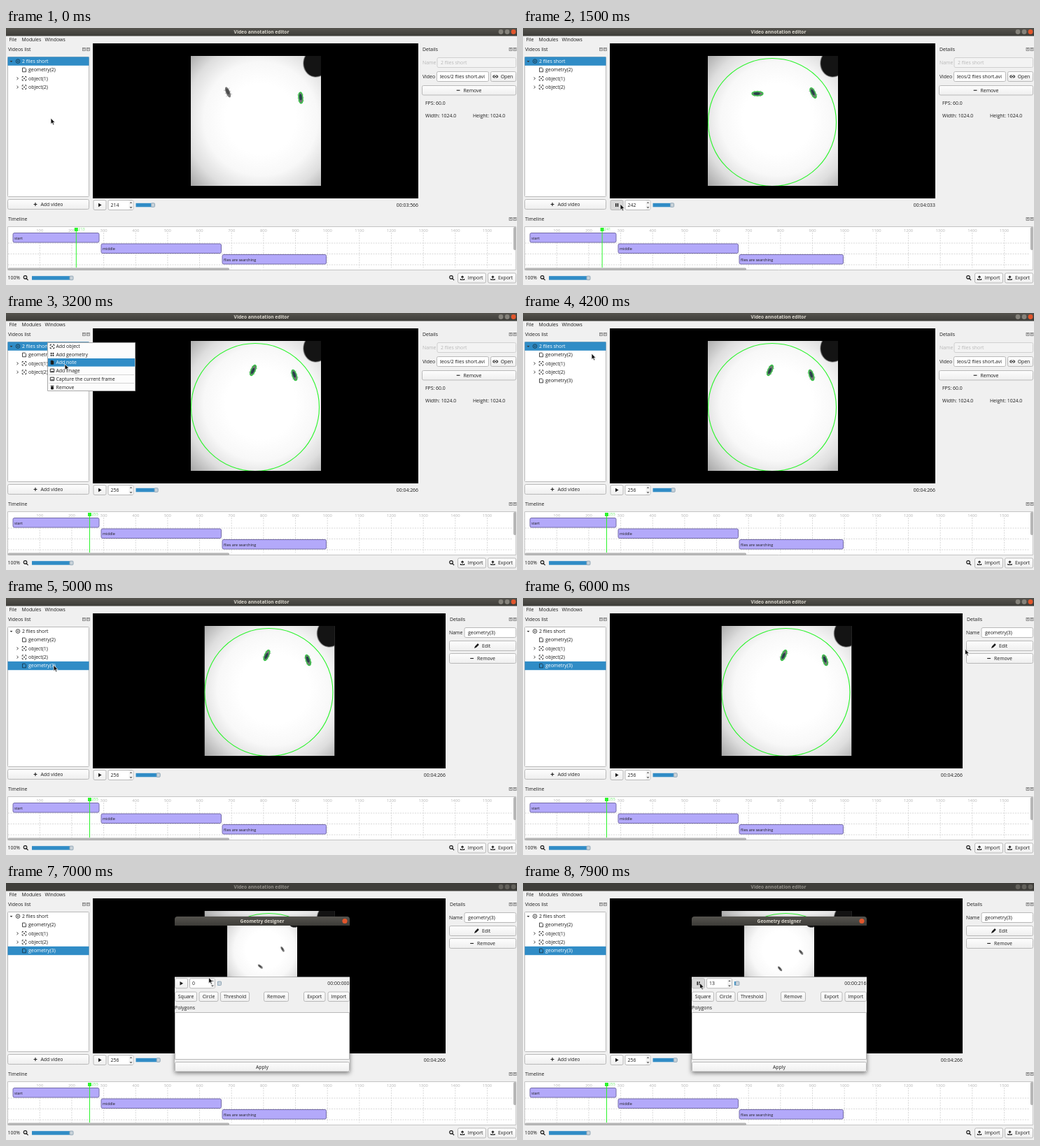
An HTML page with a canvas for the animation above (8000 ms loop, 730 by 368 pixels).

```html
<!DOCTYPE html>
<html lang="en">
<head>
<meta charset="utf-8">
<title>Video annotation editor</title>
<style>
  html, body { margin: 0; width: 730px; height: 368px; overflow: hidden; background: #f0f0f0; }
  canvas, svg { position: absolute; left: 0; top: 0; display: block; }
  #dialog { left: 241px; top: 48px; border-radius: 4px 4px 0 0; box-shadow: 0 2px 6px #0008; }
</style>
</head>
<body>
<canvas id="main" width="730" height="368"></canvas>
<canvas id="dialog" width="250" height="222"></canvas>
<svg id="cursor" width="12" height="14" viewBox="-1 -1 12 14">
  <path d="M0 0V8.5L2 6.8 3.4 10 4.8 9.3 3.5 6.3H6Z" fill="#111" stroke="#fff" stroke-width=".7"/>
</svg>
<script>
const LOOP = 8000, STEP = 100;
const PLAY = 700, FRAME_RATE = 35, FIRST = 214, LAST = 256;
const MENU_OPEN = 2700, MENU_CLOSE = 3900, SELECT = 4800, DIALOG = 6300, DIALOG_PLAY = 7530;
const BLUE = '#308cc6', INK = '#1c1c1c', GREEN = '#2cf52c';

const $ = id => document.getElementById(id);
const mainCtx = $('main').getContext('2d');
const dialogCtx = $('dialog').getContext('2d');
dialogCtx.translate(-241, -48);
let g = mainCtx;

const icons = Object.fromEntries(Object.entries({
  plus: 'M-2.4 0H2.4M0-2.4V2.4',
  minus: 'M-2.4 0H2.4',
  upload: 'M0 1.2V-2.5M-1.7-1L0-2.7 1.7-1M-2.6 1V2.5H2.6V1',
  edit: 'M-2.5 2.5L-1.8.8 1.6-2.6 2.6-1.6-.8 1.8Z',
  link: 'M-.6-1.5H-1.8A1.5 1.5 0 0 0-1.8 1.5H-.6M.6-1.5H1.8A1.5 1.5 0 0 1 1.8 1.5H.6M-1.2 0H1.2',
  zoom: 'M.9 .9L3.6 3.6M1.8-.6A2.3 2.3 0 1 1-2.8-.6A2.3 2.3 0 1 1 1.8-.6',
  object: 'M-2.8-1V-2.8H-1M1-2.8H2.8V-1M2.8 1V2.8H1M-1 2.8H-2.8V1M-1 0H1M0-1V1',
  page: 'M-2.5-2.8H1.2L2.5-1.5V2.8H-2.5Z',
  grid: 'M-2-2H-.9V-.9H-2ZM.9-2H2V-.9H.9ZM-2 .9H-.9V2H-2ZM.9 .9H2V2H.9Z',
  note: 'M-1.8-2.5H.8L1.8-1.5V2.5H-1.8ZM-.8 0H.8M0-1V1',
  image: 'M-2.7-2.3H2.7V2.3H-2.7ZM-1.7 1.2H1.8',
  trash: 'M-1.5-1V2.3H1.5V-1ZM-2.3-2.4H2.3',
  reel: 'M2.8 0A2.8 2.8 0 1 1-2.8 0A2.8 2.8 0 1 1 2.8 0M.7 0A.7 .7 0 1 1-.7 0A.7 .7 0 1 1 .7 0',
  right: 'M-1-1.8L1 0-1 1.8',
  down: 'M-1.8-.7H1.8L0 1.3Z',
  up: 'M-1.4 .7H1.4L0-1Z',
}).map(([name, d]) => [name, new Path2D(d)]));

const clamp = (v, lo = 0, hi = 1) => Math.min(hi, Math.max(lo, v));

// Interpolates rows of [key, ...values]
function track(rows, key, ease = p => p) {
  const i = rows.findIndex(r => r[0] > key);
  if (i < 0) return rows.at(-1).slice(1);
  if (i === 0) return rows[0].slice(1);
  const a = rows[i - 1], b = rows[i], p = ease((key - a[0]) / (b[0] - a[0]));
  return a.slice(1).map((v, k) => v + (b[k + 1] - v) * p);
}

function rect(x, y, w, h, fill) {
  g.fillStyle = fill;
  g.fillRect(x, y, w, h);
}

function box(x, y, w, h, fill, stroke = '#b9b9b9', radius = 2) {
  g.beginPath();
  g.roundRect(x + .5, y + .5, w - 1, h - 1, radius);
  g.fillStyle = fill;
  g.fill();
  g.strokeStyle = stroke;
  g.lineWidth = 1;
  g.stroke();
}

function dot(x, y, r, fill) {
  g.beginPath();
  g.arc(x, y, r, 0, 7);
  g.fillStyle = fill;
  g.fill();
}

function text(s, x, y, { color = INK, size = 6.9, align = 'left', weight = 400 } = {}) {
  g.font = `${weight} ${size}px "Open Sans", sans-serif`;
  g.textAlign = align;
  g.fillStyle = color;
  g.fillText(s, x, y + size * .35);
}

function icon(name, x, y, color = INK, filled = false, width = .9) {
  g.save();
  g.translate(x, y);
  g.strokeStyle = g.fillStyle = color;
  g.lineWidth = width;
  g.stroke(icons[name]);
  if (filled) g.fill(icons[name]);
  g.restore();
}

function vertical(y, h, top, bottom) {
  const fill = g.createLinearGradient(0, y, 0, y + h);
  fill.addColorStop(0, top);
  fill.addColorStop(1, bottom);
  return fill;
}

function button(x, y, w, h, label, iconName, pressed) {
  box(x, y, w, h, pressed ? '#d9d9d9' : vertical(y, h, '#fefefe', '#eeeeee'));
  const cx = x + w / 2, cy = y + h / 2;
  text(label, cx + (iconName ? 5 : 0), cy, { align: 'center' });
  if (iconName) icon(iconName, cx - g.measureText(label).width / 2 - 2.5, cy, INK, iconName === 'edit', 1.1);
}

function dockIcons(x, y) {
  for (const dx of [0, 6]) {
    g.strokeStyle = '#777';
    g.lineWidth = .8;
    g.strokeRect(x + dx - 2, y - 2, 4, 4);
    text('×', x + dx, y, { size: 5, align: 'center', color: '#444' });
  }
}

const clock = frame => {
  const ms = Math.floor(frame * 1000 / 60), pad = (n, w) => String(n).padStart(w, '0');
  return `00:${pad(Math.floor(ms / 1000), 2)}:${pad(ms % 1000, 3)}`;
};

function slider(x, y, end) {
  rect(x, y, end - x - 4, 5.5, BLUE);
  box(end - 6, y - .5, 6, 6.5, '#c9d3da', '#94a9b8', 1);
}

function player(x, y, frame, playing, sliderEnd, timeX) {
  button(x, y - 7.5, 19, 15, '', null, playing);
  const cx = x + 9.5;
  if (playing) {
    rect(cx - 2, y - 2.5, 1.5, 5, INK);
    rect(cx + .7, y - 2.5, 1.5, 5, INK);
  } else {
    g.beginPath();
    g.moveTo(cx - 2, y - 2.7);
    g.lineTo(cx + 2.6, y);
    g.lineTo(cx - 2, y + 2.7);
    g.fillStyle = INK;
    g.fill();
  }
  box(x + 21, y - 7.5, 37, 15, '#fff');
  rect(x + 51, y - 6.5, 6, 13, '#f3f3f3');
  icon('up', x + 54, y - 3.5, '#555', true, .2);
  icon('down', x + 54, y + 3.5, '#555', true, .1);
  text(frame, x + 25, y);
  slider(x + 61, y - 2.7, sliderEnd);
  text(clock(frame), timeX, y, { align: 'right' });
}

function fly([x, y, angle], outlined) {
  g.save();
  g.translate(x, y);
  g.rotate(angle * Math.PI / 180);
  g.strokeStyle = '#999';
  g.lineWidth = .6;
  g.beginPath();
  for (const s of [-1, 1]) for (const dx of [-3, 0, 3]) {
    g.moveTo(dx, 0);
    g.lineTo(dx * 1.6, 4.5 * s);
  }
  g.stroke();
  g.beginPath();
  g.ellipse(0, 0, 8, 3, 0, 0, 7);
  g.fillStyle = '#757575';
  g.fill();
  if (outlined) {
    g.strokeStyle = '#35c445';
    g.lineWidth = 1.3;
    g.stroke();
  }
  g.beginPath();
  g.ellipse(-1, 0, 4.5, 1.9, 0, 0, 7);
  g.fillStyle = outlined ? '#27424a' : '#4d4d4d';
  g.fill();
  g.restore();
}

// Video picture in a 186 unit square
function picture(x, y, size, drawContent) {
  g.save();
  g.translate(x, y);
  g.scale(size / 186, size / 186);
  g.beginPath();
  g.rect(0, 0, 186, 186);
  g.clip();
  const light = g.createRadialGradient(100, 90, 50, 100, 90, 140);
  light.addColorStop(0, '#fff');
  light.addColorStop(.35, '#f8f8f8');
  light.addColorStop(.65, '#dedede');
  light.addColorStop(1, '#a2a2a2');
  rect(0, 0, 186, 186, light);
  g.beginPath();
  g.ellipse(179, 10, 18, 20, .15, 0, 7);
  g.fillStyle = '#141414';
  g.fill();
  g.strokeStyle = '#6668';
  g.lineWidth = 1.5;
  g.stroke();
  drawContent();
  g.restore();
}

function titleBar(x, y, w, h, title, active) {
  rect(x, y, w, h, active ? vertical(y, h, '#55534e', '#3d3c38') : '#3f3e3a');
  text(title, x + w / 2, y + h / 2, { size: 6.6, weight: 700, align: 'center', color: active ? '#dfdbd2' : '#96938d' });
}

function drawTree(t) {
  const items = [['2 flies short', 'reel', 'down'], ['geometry(2)', 'page'], ['object(1)', 'object', 'right'], ['object(2)', 'object', 'right']];
  if (t >= MENU_CLOSE) items.push(['geometry(3)', 'page']);
  const selected = t < SELECT ? 0 : 4;
  box(2, 41, 117, 201, '#fff', '#b9b9b9', 1);
  items.forEach(([label, iconName, arrow], i) => {
    const y = 47.6 + 12.35 * i, indent = i ? 9 : 0;
    if (i === selected) rect(2.5, y - 6.2, 116, 12.4, BLUE);
    if (arrow) icon(arrow, 7.5 + indent, y, '#333', !i, i ? .9 : .1);
    icon(iconName, 17 + indent, y, i === selected ? '#16384f' : '#333');
    text(label, 23 + indent, y, { color: i === selected ? '#fff' : INK });
  });
  button(2, 245, 117, 15, 'Add video', 'plus');
}

function drawMenu(pointerY) {
  const items = [['Add object', 'object', 48], ['Add geometry', 'grid', 59.3], ['Add note', 'note', 70.8],
    ['Add image', 'image', 82.4], ['Capture the current frame', 'image', 94.5], ['Remove', 'trash', 106.7]];
  box(59, 42, 126, 70, '#fcfcfc', '#a8a8a8', 0);
  rect(61, 88, 122, 1, '#d5d5d5');
  rect(61, 100, 122, 1, '#d5d5d5');
  for (const [label, iconName, y] of items) {
    const hover = Math.abs(pointerY - y) < 5.8;
    if (hover) rect(60, y - 5.8, 124, 11.6, BLUE);
    icon(iconName, 66, y, INK, /note|trash|grid/.test(iconName));
    text(label, 71.5, y, { color: hover ? '#fff' : INK });
  }
}

function drawDetails(geometry) {
  const x = geometry ? 633 : 594;
  text('Details', x + 1, 30.5);
  dockIcons(721, 30.5);
  const disabled = '#b8b8b8';
  text('Name', x + (geometry ? 0 : 1), 49.5, { color: geometry ? INK : disabled });
  box(x + 21.5, 42, 729 - x - 21.5, 15, geometry ? '#fff' : '#f3f3f3', geometry ? '#b9b9b9' : '#d0d0d0');
  text(geometry ? 'geometry(3)' : '2 flies short', x + 27, 49.5, { color: geometry ? INK : disabled });
  if (geometry) {
    button(x, 61, 96, 15, 'Edit', 'edit');
    button(x, 79, 96, 15, 'Remove', 'minus');
    return;
  }
  text('Video', 595, 70);
  box(615, 62, 75, 15, '#fff');
  g.save();
  g.beginPath();
  g.rect(620, 63, 66, 13);
  g.clip();
  text('videos/2 flies short.avi', 684, 70, { align: 'right' });
  g.restore();
  button(692, 62, 37, 15, 'Open', 'link');
  button(594, 82, 135, 14.5, 'Remove', 'minus');
  text('FPS: 60.0', 599, 107.5);
  text('Width: 1024.0', 599, 126);
  text('Height: 1024.0', 667, 126);
}

function drawVideo(t, frame, right) {
  rect(124, 22, right - 124, 222, '#000');
  const started = t >= PLAY;
  picture((124 + right) / 2 - 92.5, 40, 186, () => {
    fly(track([[FIRST, 53, 52, 68], [242, 71, 54, 0], [LAST, 89, 42, -66]], frame), started);
    fly(track([[FIRST, 157, 60, 85], [242, 150.5, 53, 64], [LAST, 148, 49, 72]], frame), true);
    if (!started) return;
    g.beginPath();
    g.arc(92, 95, 91.5, 0, 7);
    g.strokeStyle = GREEN;
    g.lineWidth = 1.1;
    g.stroke();
  });
  const sliderEnd = 189.5 + frame * (right > 600 ? .122 : .11);
  player(124.5, 253.5, frame, started && frame < LAST, sliderEnd, right);
}

function drawTimeline(frame) {
  const toX = f => 2.6 + f * .4566;
  text('Timeline', 3, 273.5);
  dockIcons(721, 273.5);
  box(2, 284, 727, 63, '#fff', '#c4c4c4', 0);
  g.save();
  g.setLineDash([2, 1.5]);
  g.strokeStyle = '#cfcfcf';
  g.lineWidth = .8;
  g.beginPath();
  for (let f = 0; f <= 1500; f += 100) {
    g.moveTo(toX(f), 293);
    g.lineTo(toX(f), 343);
    if (f) text(f, toX(f), 289.5, { size: 5.8, align: 'center', color: '#b4b4b4' });
  }
  for (const y of [308, 323.5, 339]) {
    g.moveTo(3, y);
    g.lineTo(724, y);
  }
  g.stroke();
  g.restore();
  [['start', 9.5, 124], ['middle', 135.5, 172.5], ['flies are searching', 308.5, 149.5]].forEach(([label, x, w], i) => {
    const y = 293 + 15.5 * i;
    box(x, y, w, 14.5, '#b3a9fa', '#756ca8');
    text(label, x + 2.5, y + 7.6, { size: 5.5 });
  });
  const x = toX(frame);
  rect(x - .5, 288, 1, 55, GREEN);
  rect(x - 2.5, 286, 5, 5, GREEN);
  text(frame - 1, x + 3, 288, { size: 5.4, color: '#6eea6e' });
  box(725, 285, 3.5, 33, '#bdbdbd', '#aaa', 1);
  box(3, 343.5, 316, 3.5, '#bdbdbd', '#aaa', 1);

  text('100%', 2.5, 358);
  icon('zoom', 28, 357.5, INK, false, 1.2);
  slider(37, 355.2, 96.5);
  icon('zoom', 636.5, 357.5, INK, false, 1.2);
  button(645, 350.5, 41, 15, 'Import', 'upload');
  button(688, 350.5, 41, 15, 'Export', 'upload');
}

function drawMain(t, frame, pointerY) {
  g = mainCtx;
  const active = t <= DIALOG, geometry = t >= SELECT;
  rect(0, 0, 730, 368, '#f0f0f0');
  titleBar(0, 0, 730, 11.5, 'Video annotation editor', active);
  [707, 716, 725].forEach((x, i) => dot(x, 5.5, 3.4, active ? (i < 2 ? '#85827b' : '#e2562c') : '#63615b'));
  text('File', 4.5, 17);
  text('Modules', 22.5, 17);
  text('Windows', 55.5, 17);
  text('Videos list', 3, 30.5);
  dockIcons(111.5, 30.5);
  drawTree(t);
  drawVideo(t, frame, geometry ? 628 : 589);
  drawDetails(geometry);
  drawTimeline(frame);
  if (t >= MENU_OPEN && t < MENU_CLOSE) drawMenu(pointerY);
}

function drawDialog(t) {
  const shown = clamp((t - DIALOG) / 115);
  const style = $('dialog').style;
  style.opacity = shown;
  style.transform = `scaleY(${.2 + .8 * shown})`;
  if (!shown) return;
  g = dialogCtx;
  const frame = Math.max(0, Math.floor((t - DIALOG_PLAY) * FRAME_RATE / 1000 + .1));
  rect(241, 48, 250, 222, '#f0f0f0');
  titleBar(241, 48, 250, 13, 'Geometry designer', true);
  dot(484, 54.5, 3.6, '#e2562c');
  rect(241, 61, 250, 73.5, '#000');
  if (shown === 1) {
    g.save();
    g.beginPath();
    g.rect(241, 61, 250, 73.5);
    g.clip();
    picture(316, 47.5, 100, () => {
      fly(track([[0, 147, 88, 60], [13, 151, 96, 50]], frame));
      fly(track([[0, 88, 134, 40], [13, 95, 140, 50]], frame));
    });
    g.restore();
  }
  player(241, 143.7, frame, t >= DIALOG_PLAY, 308 + frame * .11, 490.5);
  for (const [label, x, w] of [['Square', 241, 32], ['Circle', 275.5, 28], ['Threshold', 306, 42],
    ['Remove', 368, 36], ['Export', 425, 31.5], ['Import', 459.5, 31.5]]) button(x, 155.5, w, 14.5, label);
  text('Polygons', 241, 179);
  box(241, 185, 250, 68, '#fff', '#b9b9b9', 0);
  button(241, 256, 250, 14.5, 'Apply');
}

const pointer = [
  [100, 64, 129], [650, 139, 252], [2000, 139, 252], [2600, 59, 43], [2700, 59, 43], [3200, 84, 73],
  [3800, 98, 58], [4200, 98, 58], [4800, 68, 96], [5000, 68, 96], [5700, 681, 66], [5900, 681, 66],
  [6200, 490, 93], [6400, 490, 93], [7200, 252.5, 143],
];
const smooth = p => p * p * (3 - 2 * p);

function render() {
  const t = Math.floor(performance.now() % LOOP / STEP) * STEP;
  const frame = clamp(Math.floor(FIRST + (t - PLAY) * FRAME_RATE / 1000), FIRST, LAST);
  const [x, y] = track(pointer, t, smooth);
  drawMain(t, frame, y);
  drawDialog(t);
  $('cursor').style.transform = `translate(${x - 1}px, ${y - 1}px)`;
  requestAnimationFrame(render);
}
render();
</script>
</body>
</html>
```
